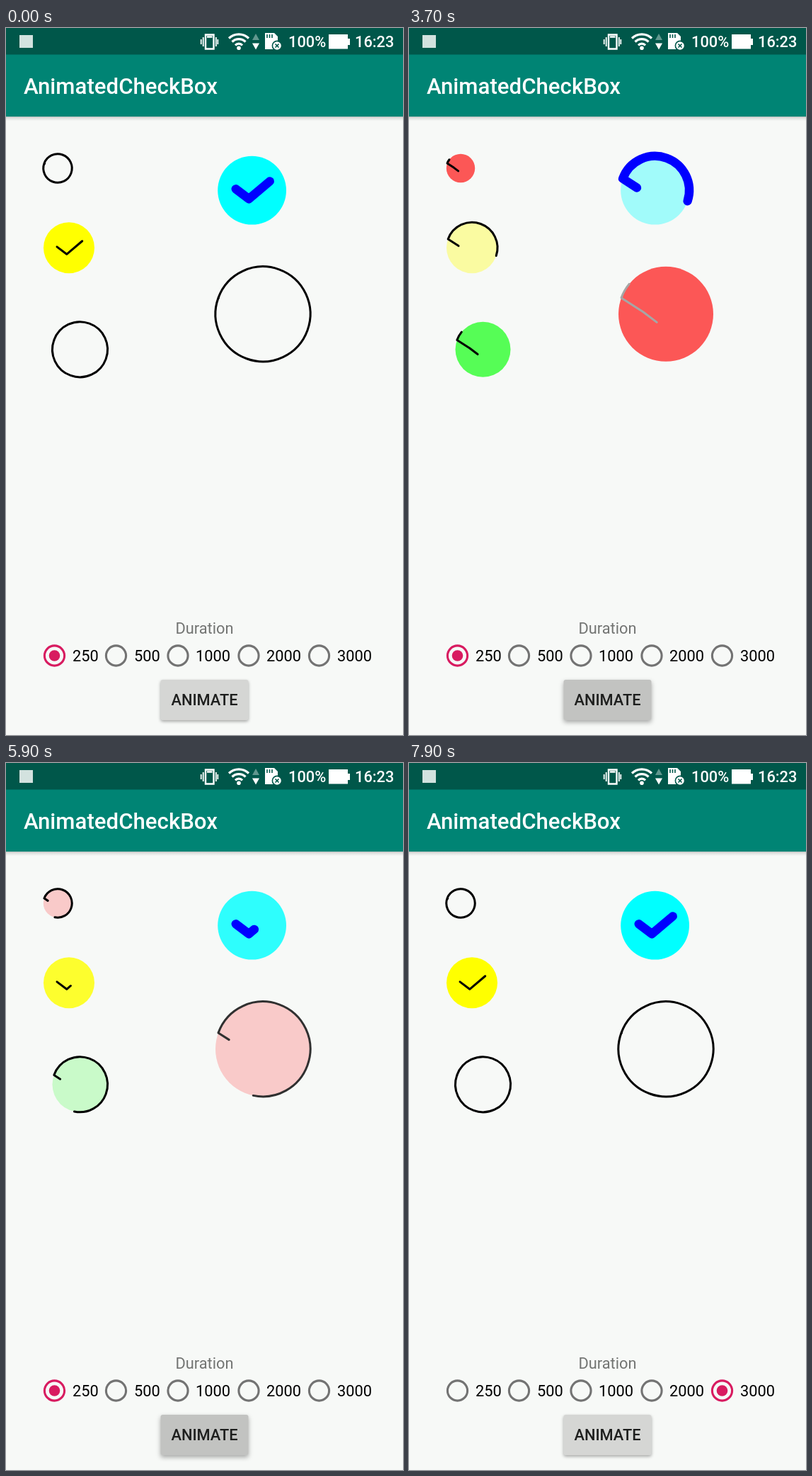
Recreate the animation shown at these times as an HTML page. Size 561 by 998 pixels, loop 8 s.

```html
<!DOCTYPE html>
<html lang="en">
<head>
<meta charset="utf-8">
<title>AnimatedCheckBox</title>
<style>
  html, body { margin: 0; width: 100%; height: 100%; overflow: hidden; background: #f7f9f7; }
  svg { display: block; width: 100vw; height: 100vh; font: 21.8px Roboto, sans-serif; }
  .medium { font-weight: 500; }
  .trim { fill: none; stroke-linecap: round; stroke-linejoin: round; }
  #button { filter: drop-shadow(0 2px 2px rgba(0, 0, 0, .33)); }
</style>
</head>
<body>
<svg id="stage" viewBox="0 0 561 998">
  <defs>
    <linearGradient id="shade" x2="0" y2="1">
      <stop stop-color="#000" stop-opacity=".26"/>
      <stop offset=".4" stop-color="#000" stop-opacity=".09"/>
      <stop offset="1" stop-color="#000" stop-opacity="0"/>
    </linearGradient>
    <clipPath id="buttonClip"><rect x="218.5" y="920" width="124" height="57" rx="3"/></clipPath>
  </defs>

  <rect width="561" height="998" fill="#f7f9f7"/>
  <rect y="124.5" width="561" height="7" fill="url(#shade)"/>
  <rect y="37" width="561" height="88" fill="#008474"/>
  <rect width="561" height="37.5" fill="#00574a"/>
  <text class="medium" x="25" y="93" font-size="31.2" fill="#fff">AnimatedCheckBox</text>

  <!-- status bar -->
  <g fill="#fff">
    <rect x="19" y="10" width="19" height="18" fill="#d3e2df"/>
    <path d="M282 9.5h11.5v20H282zM284 12.5h7.5" fill="none" stroke="#fff" stroke-width="2.4"/>
    <path d="M278.7 13v13M275.7 16v7M296.8 13v13M299.3 16v7" stroke="#fff" stroke-width="1.8"/>
    <g fill="none" stroke="#fff" stroke-width="3.2">
      <path d="M315 14.5a20 20 0 0 1 28 0M319.5 19.5a13.4 13.4 0 0 1 19 0M324 24.3a7 7 0 0 1 10 0"/>
    </g>
    <circle cx="329" cy="28.3" r="2.8"/>
    <path d="M348 17l5-9 5 9z" opacity=".38"/>
    <path d="M348 21.5h10l-5 9z"/>
    <path d="M366 7h13l5 5v18h-18z"/>
    <path d="M369 9v5M372.5 9v5M376 9v5" stroke="#00574a" stroke-width="1.6"/>
    <circle cx="383" cy="25" r="6.6" stroke="#00574a" stroke-width="1.6"/>
    <path d="M380.5 22.5l5 5m0-5l-5 5" stroke="#00574a" stroke-width="1.7"/>
    <text class="medium" x="399" y="27">100%</text>
    <path d="M456 9h27v6h3v9h-3v5.500h-27z"/>
    <text class="medium" x="493" y="27">16:23</text>
  </g>

  <g id="boxes"></g>

  <text x="280.500" y="854.500" text-anchor="middle" fill="#737573">Duration</text>
  <g id="radios"></g>

  <g id="button">
    <rect x="218.5" y="920" width="124" height="57" rx="3" fill="#d5d6d4"/>
    <g clip-path="url(#buttonClip)">
      <rect id="pressTint" x="218" y="920" width="125" height="57" fill="#000"/>
      <circle id="ripple" cy="950"/>
    </g>
  </g>
  <text class="medium" x="280.500" y="956" text-anchor="middle" fill="#1d1e1d">ANIMATE</text>
</svg>

<script>
const LOOP = 8000, STEP = 100, ACCENT = '#d81b60';
const TAPS = [{ at: 3537, x: 290 }, { at: 5697, x: 312 }];
const SWITCH = 7100;

const $ = id => document.getElementById(id);
const clamp = v => Math.max(0, Math.min(1, v));
const ramp = (t, start, span) => clamp((t - start) / span);

function add(parent, tag, attrs) {
  const el = document.createElementNS('http://www.w3.org/2000/svg', tag);
  parent.append(el);
  set(el, attrs);
  return el;
}
function set(el, attrs) {
  for (const key in attrs) el.setAttribute(key, attrs[key]);
}

// Show only the part of a path between two lengths.
function trim(el, from, to) {
  set(el, { 'stroke-dasharray': `${Math.max(.01, to - from)} 9999`, 'stroke-dashoffset': -from });
}

// Unit shape: ring entry, then start, corner and end of the tick.
const TICK = [[-.94, -.342], [-.48, -.045], [-.09, .25], [.52, -.265]];
const LEGS = TICK.slice(1).map(([x, y], i) => Math.hypot(x - TICK[i][0], y - TICK[i][1]));
const RING = 2 * Math.PI;
const PHASE = .75;

function checkBox({ x, y, r, w = 3, fill, line = '#000', border, borderWidth, fade, inverse }) {
  const g = add($('boxes'), 'g', { transform: `translate(${x} ${y})` });
  const pt = ([a, b]) => `${a * r} ${b * r}`;
  const [entry, ...rest] = TICK;
  const arc = to => `A${r} ${r} 0 0 0 ${pt(to)}`;
  const ring = `M${pt(entry)}${arc(entry.map(v => -v))}${arc(entry)}`;

  const disc = add(g, 'circle', { r, fill });
  const rim = border && add(g, 'path', { class: 'trim', d: ring, stroke: border, 'stroke-width': borderWidth });
  const stroke = add(g, 'path', {
    class: 'trim', d: ring + rest.map(p => 'L' + pt(p)).join(''), stroke: line, 'stroke-width': w
  });

  return progress => {
    const p = inverse ? 1 - progress : progress;
    const first = clamp(p / PHASE), second = clamp((p - PHASE) / (1 - PHASE));
    const tail = (RING + LEGS[0]) * first;
    const head = RING + (LEGS[0] + LEGS[1]) * first + LEGS[2] * second;
    trim(stroke, tail * r, head * r);
    set(disc, { 'fill-opacity': p });
    if (fade) {
      const v = Math.round(255 * p);
      set(stroke, { stroke: `rgb(${v},${v},${v})` });
    }
    if (rim) {
      set(rim, { visibility: second ? 'visible' : 'hidden' });
      trim(rim, 0, RING * second * r + (second === 1 ? 1 : 0));
    }
  };
}

const boxes = [
  { x: 73, y: 198, r: 20.2, fill: '#f00', border: '#000', borderWidth: 3 },
  { x: 89, y: 310.3, r: 36, fill: '#ff0', inverse: true },
  { x: 104.5, y: 453.8, r: 39, fill: '#0f0', border: '#f0f', borderWidth: 15.5 },
  { x: 347.6, y: 229.2, r: 48.4, w: 12.4, fill: '#0ff', line: '#00f', inverse: true },
  { x: 363, y: 403.8, r: 67, fill: '#f00', fade: true }
].map(checkBox);

const radios = [[68.5, 250, 94], [155.5, 500, 181], [243, 1000, 268], [343, 2000, 368], [442.5, 3000, 468]]
  .map(([cx, label, tx]) => {
    const g = $('radios'), cy = 886;
    const halo = add(g, 'circle', { cx, cy, r: 0 });
    const ring = add(g, 'circle', { cx, cy, r: 14.1, fill: 'none', 'stroke-width': 3.1 });
    const dot = add(g, 'circle', { cx, cy, fill: ACCENT });
    add(g, 'text', { x: tx, y: 894 }).textContent = label;
    return { halo, pick(v) {
      set(ring, { stroke: v > .5 ? ACCENT : '#737373' });
      set(dot, { r: 7.8 * v });
    } };
  });

function drawButton(t) {
  const tap = t < 5000 ? TAPS[0] : TAPS[1];
  const age = t - tap.at;
  const alpha = age < 0 ? 0 : 1 - ramp(age, 250, 350);
  set($('ripple'), { cx: tap.x, r: 14 + .65 * Math.max(0, age), 'fill-opacity': .06 * alpha });
  set($('pressTint'), { 'fill-opacity': .03 * alpha });
  const lift = alpha ? 3 : 2;
  $('button').style.filter = `drop-shadow(0 ${lift}px ${lift}px rgba(0,0,0,.33))`;
}

function drawRadios(t) {
  const on = ramp(t, SWITCH + 50, 150);
  radios.forEach((radio, i) => radio.pick(i === 0 ? 1 - on : i === 4 ? on : 0));
  set(radios[4].halo, {
    r: t < SWITCH ? 0 : 10 + 20 * ramp(t, SWITCH, 200),
    'fill-opacity': .1 * (1 - ramp(t, SWITCH + 200, 350))
  });
}

function draw(now) {
  const t = Math.floor(now % LOOP / STEP) * STEP;
  const p = ramp(t, TAPS[0].at, 250) - ramp(t, TAPS[1].at, 250);
  boxes.forEach(paint => paint(p));
  drawButton(t);
  drawRadios(t);
}

const begin = performance.now();
function tick() {
  draw(performance.now() - begin);
  requestAnimationFrame(tick);
}
tick();
</script>
</body>
</html>
```
